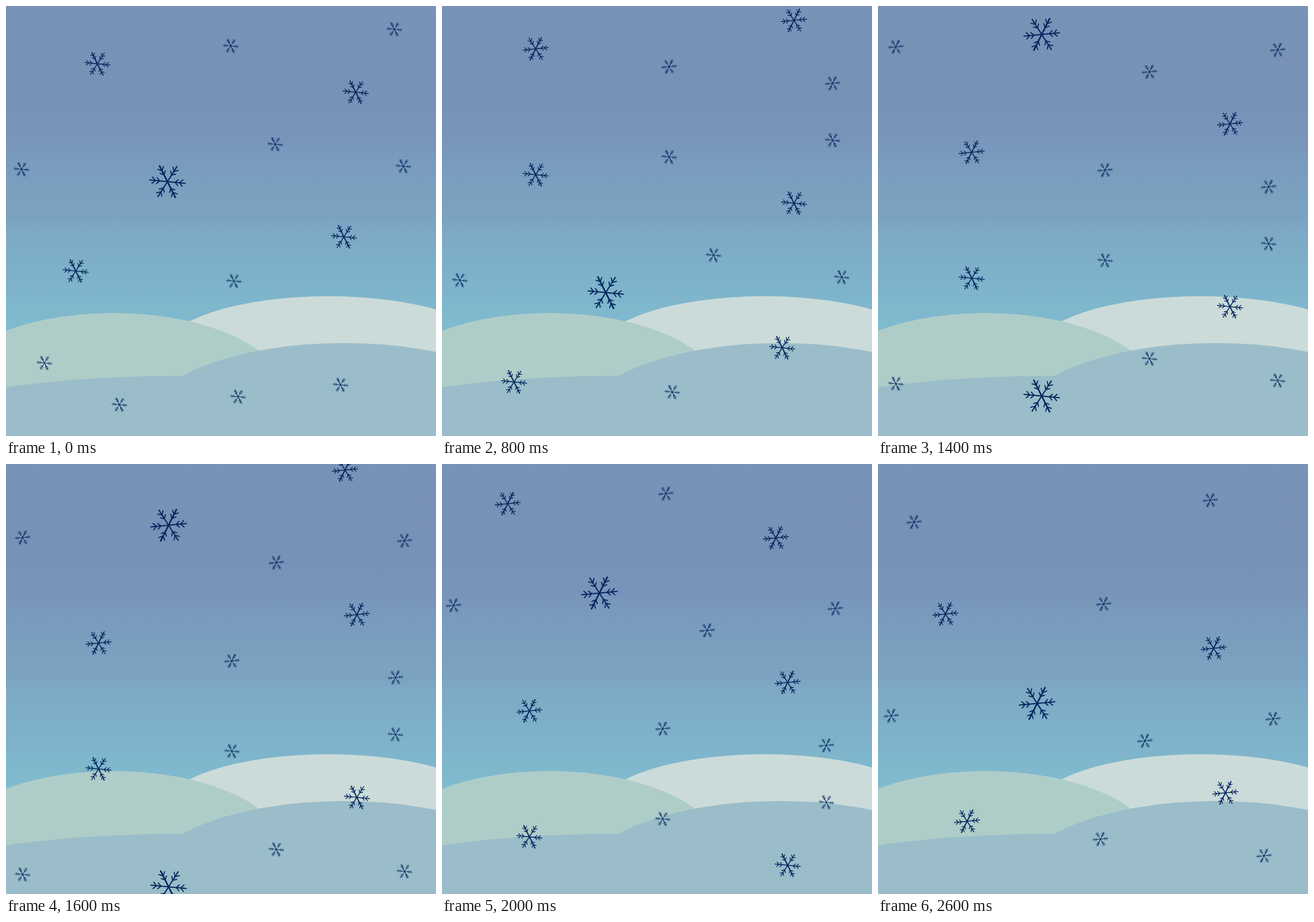
These frames come from a looping animation (748x748 px, 2800 ms). An HTML page with a canvas:

```html
<!DOCTYPE html>
<html>
<head>
<meta charset="utf-8">
<style>
  html, body { margin: 0; width: 100%; height: 100%; overflow: hidden; }
  canvas { display: block; width: 748px; height: 748px; }
</style>
</head>
<body>
<canvas id="stage" width="748" height="748"></canvas>
<script>
const SIZE = 748, STEP_MS = 200;
const ctx = document.getElementById('stage').getContext('2d');

// Drift and fall of the whole snowfield at each step.
const DRIFT = [0, -1, 0, 2, 4, 4, 4, 4, 2, -4, -7, -7, -5.5, -4];
const FALL = [0, 38, 95, 144, 193, 250, 324, 373, 430, 487, 548, 604, 672, 740];

const SMALL = 13.8, MEDIUM = 22.6, LARGE = 31.8;
const MIRROR_SUM = -18, MIRROR_LIMIT = 670;
const FLAKES = [
  [675.5, 40.5, SMALL], [391, 69.5, SMALL], [159, 100.5, MEDIUM],
  [608.3, 150, MEDIUM], [468.3, 240.5, SMALL], [691.3, 278.7, SMALL],
  [27, 284, SMALL], [280.8, 305.5, LARGE], [587.8, 401.5, MEDIUM],
  [121.3, 461, MEDIUM], [396.5, 478.5, SMALL], [66.7, 621, SMALL],
  [582, 659, SMALL], [403.7, 679.7, SMALL], [197.3, 693.5, SMALL]
];

const sky = ctx.createLinearGradient(0, 0, 0, 560);
[[0, '#7992b7'], [0.3, '#7891b7'], [0.4, '#7994ba'], [0.48, '#799bbe'],
 [0.58, '#7ba0bf'], [0.66, '#7ba3c1'], [0.7, '#7da9c5'], [0.85, '#7eb2ca'],
 [1, '#80bbcf']
].forEach(([offset, color]) => sky.addColorStop(offset, color));

function hill(color, x, peak, rx, ry) {
  ctx.fillStyle = color;
  ctx.beginPath();
  ctx.ellipse(x, peak + ry, rx, ry, 0, 0, Math.PI * 2);
  ctx.fill();
}

function drawScenery() {
  ctx.fillStyle = sky;
  ctx.fillRect(0, 0, SIZE, SIZE);
  hill('#cbdbd9', 561, 504.8, 290, 98);
  hill('#afcdc8', 187, 534, 300, 142);
  const front = '#9bbdc9';
  hill(front, 300, 643.5, 500, 100);
  hill(front, 588, 586.2, 345, 137);
  ctx.fillRect(0, 700, SIZE, 48);
}

// Unit snowflake: three slightly uneven axes, each arm with two pairs of barbs.
const axes = new Path2D(), thickAxis = new Path2D(), barbs = new Path2D();

function addArm(path, angle) {
  const cos = Math.cos(angle), sin = Math.sin(angle);
  path.moveTo(0, 0);
  path.lineTo(cos, sin);
  for (const [base, length] of [[0.66, 0.27], [0.42, 0.25]]) {
    for (const side of [-1, 1]) {
      const turn = angle + side * 0.78;
      barbs.moveTo(cos * base, sin * base);
      barbs.lineTo(cos * base + Math.cos(turn) * length,
                   sin * base + Math.sin(turn) * length);
    }
  }
}

for (const [degrees, path] of [[5.5, axes], [63.5, thickAxis], [122.5, axes]]) {
  const angle = degrees * Math.PI / 180;
  addArm(path, angle);
  addArm(path, angle + Math.PI);
}

function drawFlake(x, y, radius, flip) {
  if (y < -radius || y > SIZE + radius) return;
  ctx.save();
  ctx.translate(x, y);
  ctx.scale(radius, radius * flip);
  ctx.strokeStyle = '#04265c';
  ctx.lineWidth = 0.058;
  ctx.stroke(barbs);
  ctx.lineWidth = 0.066;
  ctx.stroke(axes);
  ctx.lineWidth = 0.085;
  ctx.stroke(thickAxis);
  ctx.restore();
}

function render(now) {
  const step = Math.floor(now / STEP_MS) % FALL.length;
  const dx = DRIFT[step], dy = FALL[step];
  drawScenery();
  for (const [x, y, radius] of FLAKES) {
    drawFlake(x + dx, y + dy, radius, 1);
    if (y < MIRROR_LIMIT) drawFlake(x + dx, MIRROR_SUM - y + dy, radius, -1);
  }
}

let start;
function tick(now) {
  start ??= now;
  render(Math.max(0, now - start));
  requestAnimationFrame(tick);
}
render(0);
requestAnimationFrame(tick);
</script>
</body>
</html>
```
